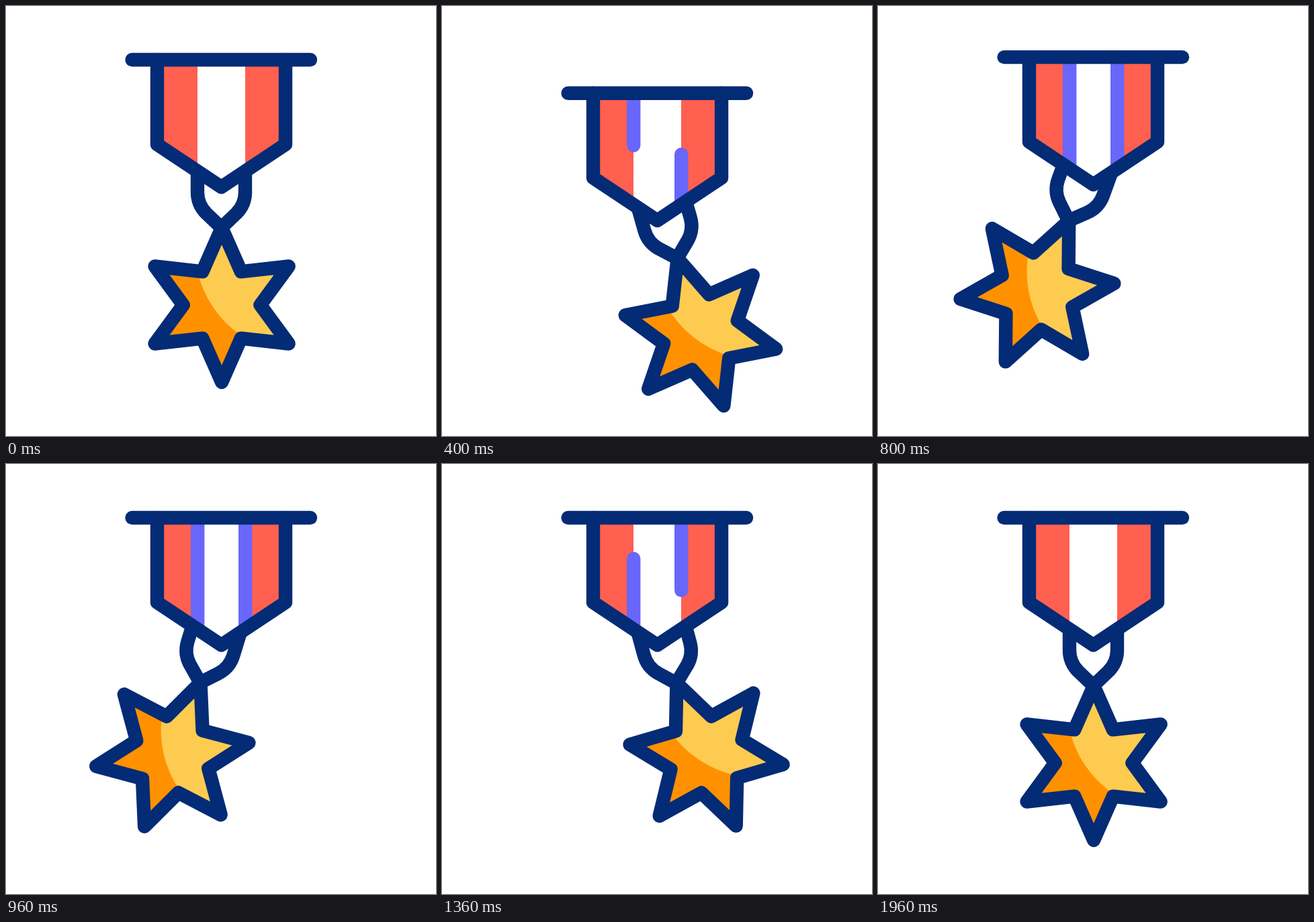
Animation of 640x640 px, one loop 2 s. Source, as an HTML page with a canvas:

```html
<!DOCTYPE html>
<html lang="en">
<head>
<meta charset="utf-8">
<title>Medal</title>
<style>
  html, body { margin: 0; width: 100%; height: 100%; overflow: hidden; background: #fff; }
  canvas { display: block; }
</style>
</head>
<body>
<canvas id="stage" width="640" height="640"></canvas>
<script>
const ctx = document.getElementById('stage').getContext('2d');
const LOOP = 2000;
const NAVY = '#042b75', RED = '#ff6050', PURPLE = '#6966fb';
const YELLOW = '#fdcb50', ORANGE = '#ff9100';
const MID = 320.5, PIVOT = 222, ARM = 108, R = 115, INNER = 57.4;

// Keys are [time in ms, value]; angles are degrees, positive to the right.
const DROP = [[100, 0], [488, 57], [732, -5.8], [910, 0]];
const RING = [[90, 0], [420, 16], [850, -21.3], [1370, 15.2], [1940, 0]];
const STAR = [[90, 0], [440, 18], [855, -26.3], [1390, 23], [1940, 0]];
const GROW = [[60, 0], [780, 1]];
const LEAVE = [[1020, 0], [1860, 1]];

const rad = deg => deg * Math.PI / 180;
const smooth = x => x * x * (3 - 2 * x);

function at(keys, t) {
  if (t <= keys[0][0]) return keys[0][1];
  for (let i = 1; i < keys.length; i++) {
    const [t0, a] = keys[i - 1], [t1, b] = keys[i];
    if (t < t1) return a + (b - a) * smooth((t - t0) / (t1 - t0));
  }
  return keys[keys.length - 1][1];
}

function poly(points, close) {
  ctx.beginPath();
  points.forEach(([x, y]) => ctx.lineTo(x, y));
  if (close) ctx.closePath();
}

function stroke(color) {
  ctx.strokeStyle = color;
  ctx.stroke();
}

function line(x, y0, y1, color) {
  poly([[x, y0], [x, y1]]);
  stroke(color);
}

// Drawn around the pivot
function ring() {
  ctx.beginPath();
  ctx.moveTo(-35.5, 16);
  ctx.lineTo(-35.5, 55);
  ctx.bezierCurveTo(-35.5, 67, -31, 78, -22.5, 86.5);
  ctx.lineTo(0, ARM);
  ctx.lineTo(22.5, 86.5);
  ctx.bezierCurveTo(31, 78, 35.5, 67, 35.5, 55);
  ctx.lineTo(35.5, 16);
  stroke(NAVY);
}

// Drawn below its top point
function star() {
  const pts = [];
  for (let i = 0; i < 12; i++) {
    const r = i % 2 ? INNER : R, a = rad(i * 30);
    pts.push([r * Math.sin(a), R - r * Math.cos(a)]);
  }
  poly(pts, true);
  ctx.save();
  ctx.clip();
  ctx.fillStyle = ORANGE;
  ctx.fillRect(-R, 0, 2 * R, 2 * R);
  ctx.fillStyle = YELLOW;
  ctx.beginPath();
  ctx.arc(118, 30, 158, 0, 2 * Math.PI);
  ctx.fill();
  ctx.restore();
  poly(pts, true);
  stroke(NAVY);
}

function ribbon(t) {
  const shape = [[225, 80], [225, 206], [MID, 269.5], [416, 206], [416, 80]];
  poly(shape, true);
  ctx.fillStyle = '#fff';
  ctx.fill();
  ctx.save();
  ctx.clip();
  ctx.fillStyle = RED;
  ctx.fillRect(225, 80, 60, 190);
  ctx.fillRect(356, 80, 60, 190);
  const top = 80, bottom = 249, len = bottom - top;
  const head = at(GROW, t) * len, tail = at(LEAVE, t) * len;
  if (head > tail) {
    line(285.2, top + tail, top + head, PURPLE);
    line(356.2, bottom - tail, bottom - head, PURPLE);
  }
  ctx.restore();
  poly(shape);
  stroke(NAVY);
  poly([[187.6, 80], [453, 80]]);
  stroke(NAVY);
}

function draw(t) {
  ctx.fillStyle = '#fff';
  ctx.fillRect(0, 0, 640, 640);
  ctx.lineWidth = 20.4;
  ctx.lineCap = ctx.lineJoin = 'round';

  const swing = rad(at(RING, t)), tilt = rad(at(STAR, t));
  ctx.save();
  ctx.translate(0, at(DROP, t));

  ctx.save();
  ctx.translate(MID, PIVOT);
  ctx.rotate(-swing);
  ring();
  ctx.restore();

  ctx.save();
  ctx.translate(MID + 0.6 + ARM * Math.sin(swing), PIVOT + ARM * Math.cos(swing));
  ctx.rotate(-tilt);
  star();
  ctx.restore();

  ribbon(t);
  ctx.restore();
}

const begin = performance.now();
function frame() {
  draw((performance.now() - begin) % LOOP);
  requestAnimationFrame(frame);
}
frame();
</script>
</body>
</html>
```
